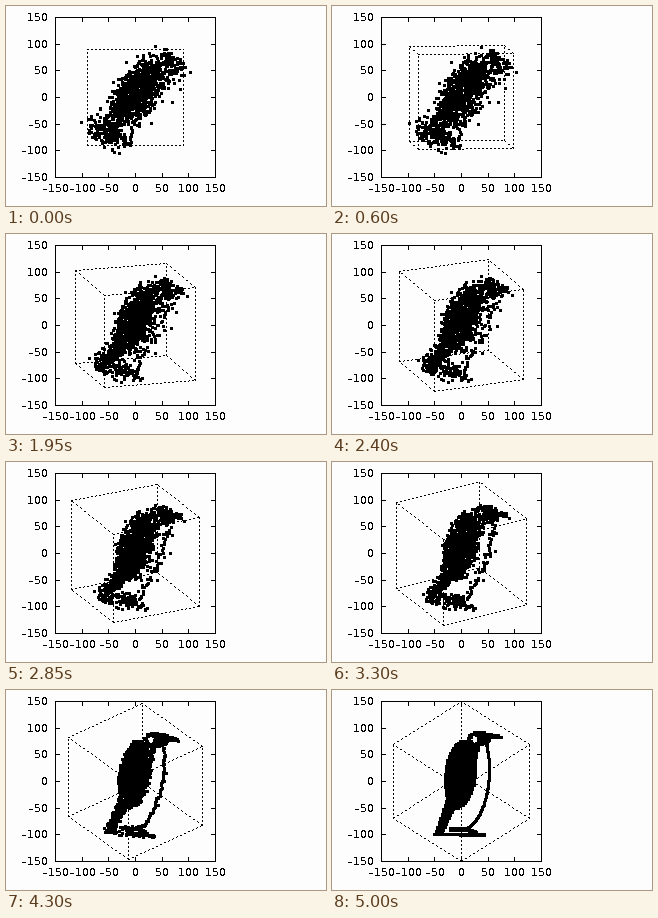
These frames come from a looping animation (320 by 200 pixels, 5.05 s). A matplotlib script:

```python
import matplotlib.pyplot as plt
import numpy as np
from matplotlib.animation import FuncAnimation

W, H, DPI = 320, 200, 100
PX = 72 / DPI                # one pixel in points
CX, CY, HALF = 129, 91, 80   # plot centre and half size in pixels
SCALE = HALF / 150           # pixels per data unit
PAPER, INK = 253, 0
FRAMES, INTERVAL = 101, 50
YAW, PITCH = np.radians(45), np.radians(40)
STEP = 1.45                  # spacing of the points in pixels

plt.rcParams.update({"font.family": "DejaVu Sans", "font.size": 11 * PX,
                     "text.hinting": "default", "text.hinting_factor": 1,
                     "text.antialiased": False})
fig = plt.figure(figsize=(W / DPI, H / DPI), dpi=DPI)
ax = fig.add_axes([0, 0, 1, 1])
ax.axis("off")


def line(img, x0, y0, x1, y1, dashed=False):
    """One-pixel line, optionally two pixels on and two off."""
    n = int(max(abs(x1 - x0), abs(y1 - y0)))
    k = np.arange(n + 1)
    xs = np.rint(x0 + (x1 - x0) * k / max(n, 1)).astype(int)
    ys = np.rint(y0 + (y1 - y0) * k / max(n, 1)).astype(int)
    on = (k % 4 < 2) | (not dashed)
    on &= (ys >= CY - HALF) & (ys <= CY + HALF)
    img[ys[on], xs[on]] = INK


# Frame, ticks and labels
base = np.full((H, W), PAPER, np.uint8)
for s in (-HALF, HALF):
    line(base, CX - HALF, CY + s, CX + HALF, CY + s)
    line(base, CX + s, CY - HALF, CX + s, CY + HALF)
for value in range(-150, 151, 50):
    d = round(value * SCALE)
    for s in (-1, 1):
        edge, inner = s * HALF, s * (HALF - 4)
        line(base, CX + d, CY + edge, CX + d, CY + inner)
        line(base, CX + edge, CY + d, CX + inner, CY + d)
    text = str(value).replace("-", "\u2013")
    ax.text(CX + d + 0.5, 186, text, ha="center", va="baseline")
    ax.text(42, CY - d + 4, text, ha="right", va="baseline")

# Penguin seen in the last view, built from ellipses and tapered strokes
gx, gy = np.meshgrid(np.arange(98, 175, STEP), np.arange(38, 150, STEP))


def ellipse(x, y, rx, ry, lean=0):
    dx = gx - x + lean * (gy - y)
    return (dx / rx) ** 2 + ((gy - y) / ry) ** 2 < 1


def taper(x0, y0, r0, x1, y1, r1):
    dx, dy = x1 - x0, y1 - y0
    k = np.clip(((gx - x0) * dx + (gy - y0) * dy) / (dx * dx + dy * dy), 0, 1)
    return np.hypot(gx - x0 - k * dx, gy - y0 - k * dy) < r0 + (r1 - r0) * k


torso = ellipse(128, 84, 15.5, 34, lean=0.1)
neck = taper(144, 51, 3, 142, 66, 3)
tail = taper(119, 112, 5.5, 107, 141, 3.5)
head = ellipse(147, 48, 11.5, 6.5) | taper(154, 45.5, 2.5, 169, 46.5, 1)
cheek = ellipse(142, 48.5, 3.6, 4.2)
feet = (taper(103, 143.5, 1, 128, 143.5, 1) | taper(128, 144, 1.5, 151, 144, 1.5)
        | taper(136, 139, 1.5, 144, 143, 1.5) | taper(118, 139, 1, 136, 139, 1))
mask = (torso | neck | tail | head | feet) & ~cheek

a = np.linspace(np.arcsin(-0.45), np.arcsin(0.97), 64)
belly = np.column_stack([127 + 30 * np.cos(a), 80 + 60 * np.sin(a)])
flat = np.vstack([np.column_stack([gx[mask], gy[mask]]), belly])

# Scatter the points along the last line of sight, then turn back to the start
rng = np.random.default_rng(7)
u = (flat[:, 0] - CX) / SCALE
v = (CY - flat[:, 1]) / SCALE
w = rng.normal(0, 18, len(u))
q = v * np.sin(PITCH) + w * np.cos(PITCH)
cloud = np.column_stack([
    u * np.cos(YAW) + q * np.sin(YAW),
    v * np.cos(PITCH) - w * np.sin(PITCH),
    q * np.cos(YAW) - u * np.sin(YAW),
])

corners = np.array([(x, y, z) for x in (-90, 90) for y in (-90, 90)
                    for z in (-90, 90)])
edges = [(i, i | bit) for i in range(8) for bit in (1, 2, 4) if not i & bit]


def project(p, t):
    yaw, pitch = YAW * t, PITCH * t
    x, y, z = p.T
    across = x * np.cos(yaw) - z * np.sin(yaw)
    depth = z * np.cos(yaw) + x * np.sin(yaw)
    up = y * np.cos(pitch) + depth * np.sin(pitch)
    return np.rint([CX + across * SCALE, CY - up * SCALE]).astype(int)


def render(t):
    img = base.copy()
    cx, cy = project(corners, t)
    for i, j in edges:
        line(img, cx[i], cy[i], cx[j], cy[j], dashed=True)
    px, py = project(cloud, t)
    for dx in (-1, 0, 1):
        for dy in (-1, 0, 1):
            img[py + dy, px + dx] = INK
    return img


view = ax.imshow(render(0), cmap="gray", vmin=0, vmax=255, aspect="auto",
                 extent=(0, W, H, 0), interpolation="nearest")


def update(i):
    view.set_data(render(i / (FRAMES - 1)))
    return [view]


anim = FuncAnimation(fig, update, frames=FRAMES, interval=INTERVAL,
                     init_func=lambda: update(0), repeat=True, repeat_delay=0)
plt.show()
```
